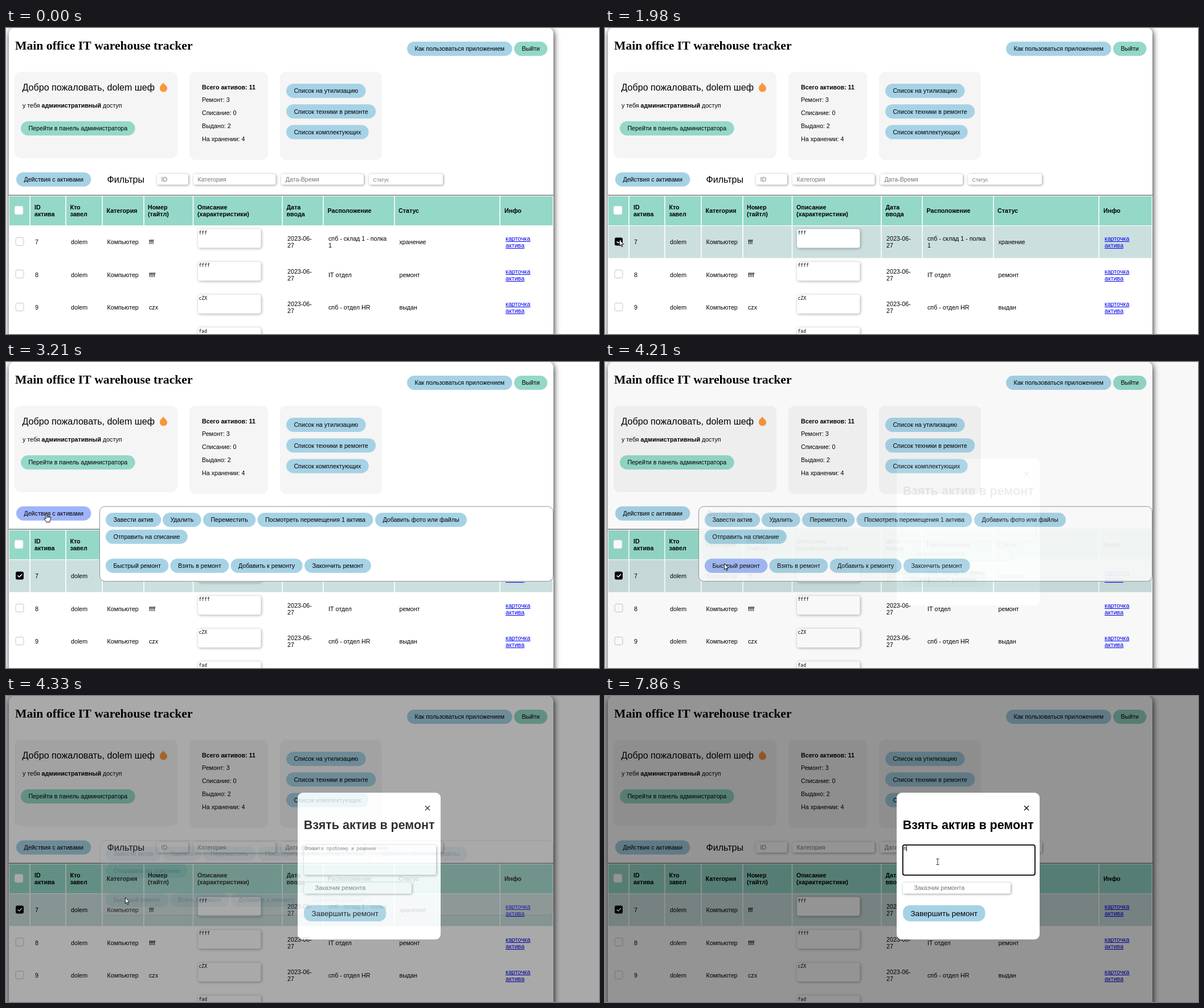
An HTML page with a canvas for the animation above (8 s loop, 1041 px wide and 538 px high).

```html
<!DOCTYPE html>
<html lang="ru">
<head>
<meta charset="utf-8">
<title>Warehouse tracker</title>
<style>
  html, body { margin: 0; width: 100%; height: 100%; overflow: hidden; background: #fff; }
  canvas { position: absolute; left: 0; top: 0; }
</style>
</head>
<body>
<script>
const W = 1041, H = 538, LOOP = 8000;
const SANS = '"Liberation Sans", Arial, sans-serif';
const SERIF = '"Liberation Serif", Cambria, serif';
const MONO = '"DejaVu Sans Mono", monospace';
const BODY = '10.7px ' + SANS, BOLD = 'bold ' + BODY, CODE = '8px ' + MONO;
const BLUE = [166, 210, 230], TEAL = [148, 216, 200], HOVER = [160, 180, 250];
const HINT = '#757575', USER = 'dolem';

function layer() {
  const c = document.createElement('canvas');
  c.width = W;
  c.height = H;
  document.body.appendChild(c);
  return c.getContext('2d');
}
const page = layer(), menu = layer(), modal = layer(), pointer = layer();
let g = page;

const rgb = c => `rgb(${c.map(Math.round)})`;
const mix = (a, b, p) => a.map((v, i) => v + (b[i] - v) * p);
const clamp = p => Math.max(0, Math.min(1, p));
const ramp = (t, a, b) => clamp((t - a) / (b - a));

// Piecewise linear value over [time, value] points
function keyed(t, keys) {
  if (t <= keys[0][0]) return keys[0][1];
  for (let i = 1; i < keys.length; i++) {
    const [t0, v0] = keys[i - 1], [t1, v1] = keys[i];
    if (t < t1) return v0 + (v1 - v0) * (t - t0) / (t1 - t0);
  }
  return keys[keys.length - 1][1];
}

function text(s, x, y, font = BODY, color = '#000') {
  g.font = font;
  g.fillStyle = color;
  g.fillText(s, x, y);
  return g.measureText(s).width;
}

function rect(x, y, w, h, color) {
  g.fillStyle = color;
  g.fillRect(x, y, w, h);
}

function box(x, y, w, h, r, fill, stroke, lw = 1) {
  g.beginPath();
  g.roundRect(x, y, w, h, r);
  if (fill) { g.fillStyle = fill; g.fill(); }
  if (stroke) { g.strokeStyle = stroke; g.lineWidth = lw; g.stroke(); }
}

function shadowed(blur, dx, dy, color, draw) {
  g.save();
  g.shadowBlur = blur;
  g.shadowOffsetX = dx;
  g.shadowOffsetY = dy;
  g.shadowColor = color;
  draw();
  g.restore();
}

const field = (x, y, w, h) =>
  shadowed(4, 1, 1, 'rgba(0,0,0,.4)', () => box(x, y, w, h, 3, '#fff'));

function button(s, x, y, color = BLUE, size = 10.7, h = 25) {
  g.font = `${size}px ${SANS}`;
  box(x, y, g.measureText(s).width + 26.8, h, 12.5, rgb(color));
  text(s, x + 13.4, y + h / 2 + size * .36, g.font);
}

function flame() {
  g.fillStyle = '#f9963b';
  g.beginPath();
  g.moveTo(276, 95.5);
  g.bezierCurveTo(277, 99, 283, 101, 283, 106);
  g.bezierCurveTo(283, 114.5, 270, 114.5, 270, 106);
  g.bezierCurveTo(270, 103, 271, 101.5, 272.5, 100);
  g.bezierCurveTo(274, 99, 275.5, 98, 276, 95.5);
  g.fill();
}

const EDGES = [6, 42, 105, 169, 242, 328.5, 485, 557, 682, 867, 960.5];
const HEADS = [
  [50, 'ID', 'актива'], [112.5, 'Кто', 'завел'], [176.5, 'Категория'],
  [249, 'Номер', '(тайтл)'], [336, 'Описание', '(характеристики)'],
  [492.5, 'Дата', 'ввода'], [564.5, 'Расположение'], [689, 'Статус'], [875, 'Инфо']
];
const ROWS = [
  ['7', 'fff', 'fff', ['спб - склад 1 - полка', '1'], 'хранение'],
  ['8', 'ffff', 'ffff', ['IT отдел'], 'ремонт'],
  ['9', 'czx', 'cZX', ['спб - отдел HR'], 'выдан'],
  ['10', 'fad', 'fad', ['IT отдел'], 'хранение']
];
const PITCH = 57.7;

function lines(list, x, mid, font, color) {
  list.forEach((s, i) => text(s, x, mid + 4 + (i - (list.length - 1) / 2) * 12, font, color));
}

function cells(y, h, color) {
  for (let i = 0; i < EDGES.length - 1; i++) {
    const x = EDGES[i] + (i ? .8 : 0);
    rect(x, y, EDGES[i + 1] - .8 - x, h, color);
  }
}

function checkbox(x, y, checked, hot) {
  if (!checked) return box(x + .5, y + .5, 14, 14, 3, '#fff', hot ? '#888' : '#c6c6c6');
  box(x + .5, y + .5, 14, 14, 3, '#000');
  g.strokeStyle = '#fff';
  g.lineWidth = 1.6;
  g.beginPath();
  g.moveTo(x + 4, y + 7.5);
  g.lineTo(x + 6.8, y + 10);
  g.lineTo(x + 11.5, y + 5);
  g.stroke();
}

function row(i, t, hot) {
  const [id, name, note, place, status] = ROWS[i];
  const y = i * PITCH, mid = 376 + y, picked = i === 0 && t >= 1980;
  if (picked) cells(348, 56.5, '#cbdfde');
  else if (hot) cells(348 + y, 56.5, '#f5f5f5');
  checkbox(16.5, Math.round(367.5 + y), picked, hot && t > 1600);
  shadowed(5, 1, 1, 'rgba(0,0,0,.35)', () => box(337, 353.5 + y, 110.5, 33, 4, '#fff'));
  text(note, 338.5, 362.5 + y, CODE);
  if (mid > H) return;
  text(id, 51, mid + 4);
  text(USER, 114, mid + 4);
  text('Компьютер', 177.5, mid + 4);
  text(name, 251, mid + 4);
  lines(['2023-06-', '27'], 494, mid);
  lines(place, 566, mid);
  text(status, 690.5, mid + 4);
  ['карточка', 'актива'].forEach((s, k) => {
    const base = mid - 2 + k * 12;
    const w = text(s, 877, base, BODY, '#0000ee');
    rect(877, Math.round(base + 1), w, 1, '#0000ee');
  });
}

function drawPage(t, cur) {
  g = page;
  rect(0, 0, W, H, '#fff');
  shadowed(11, 1, 3, 'rgba(0,0,0,.85)', () => box(5, -1, 956, 620, 11, '#fff'));

  text('Main office IT warehouse tracker', 16, 37.5, 'bold 21.7px ' + SERIF);
  button('Как пользоваться приложением', 704, 24);
  button('Выйти', 892, 24, TEAL);

  box(15, 77, 286, 152, 11, '#f5f5f5');
  box(322, 77, 138, 155, 11, '#f5f5f5');
  box(481, 77, 179, 155, 11, '#f5f5f5');

  text(`Добро пожаловать, ${USER} шеф`, 28.5, 110, '16.1px ' + SANS);
  flame();
  let x = 29;
  x += text('у тебя ', x, 139.5);
  x += text('административный', x, 139.5, BOLD);
  text(' доступ', x, 139.5);
  button('Перейти в панель администратора', 26, 164, TEAL);

  ['Всего активов: 11', 'Ремонт: 3', 'Списание: 0', 'Выдано: 2', 'На хранении: 4']
    .forEach((s, i) => text(s, 344, 107.5 + i * 22.9, i ? BODY : BOLD));
  ['Список на утилизацию', 'Список техники в ремонте', 'Список комплектующих']
    .forEach((s, i) => button(s, 492, 98 + i * 36.2));

  const hot = ramp(t, 2400, 2610) - ramp(t, 3480, 3640);
  button('Действия с активами', 18, 253.7, mix(BLUE, HOVER, hot));
  text('Фильтры', 177.5, 272, '16.1px ' + SANS);
  [[265, 55, 'ID'], [329, 144.5, 'Категория'], [483, 145, 'Дата-Время'], [637, 130, 'Статус']]
    .forEach(([fx, w, s], i) => {
      field(fx, 256.5, w, 19);
      text(s, fx + 7.5, i < 3 ? 270 : 269.5, i < 3 ? BODY : '8.9px ' + SANS, HINT);
    });

  rect(5, 293.5, 956, 1.2, '#555');
  cells(296, 51, rgb(TEAL));
  box(15, 313, 15, 15, 3, '#fff', '#d2dedb', .8);
  HEADS.forEach(([hx, ...s]) => lines(s, hx, 321, BOLD));

  const inTable = t >= 250 && t < 1980 && cur.x < 961 && cur.y > 348;
  const over = inTable ? Math.floor((cur.y - 347.5) / PITCH) : -1;
  ROWS.forEach((_, i) => row(i, t, i === over));
}

const ACTIONS = [
  [175, 265, 'Завести актив'], [275, 265, 'Удалить'], [346, 265, 'Переместить'],
  [441.5, 265, 'Посмотреть перемещения 1 актива'], [648, 265, 'Добавить фото или файлы'],
  [175, 294.7, 'Отправить на списание'], [175, 345.7, 'Быстрый ремонт'],
  [288.5, 345.7, 'Взять в ремонт'], [394.5, 345.7, 'Добавить к ремонту'],
  [524, 345.7, 'Закончить ремонт']
];

function drawMenu(t) {
  g = menu;
  g.clearRect(0, 0, W, H);
  box(164.5, 254, 796, 131.5, 9, '#fff', '#8d9393');
  const hot = ramp(t, 3760, 3910) - ramp(t, 4190, 4330);
  ACTIONS.forEach(([x, y, s], i) => button(s, x, y, i === 6 ? mix(BLUE, HOVER, hot) : BLUE));
}

function drawModal(t) {
  g = modal;
  g.clearRect(0, 0, W, H);
  rect(0, 0, W, H, 'rgba(0,0,0,.42)');
  box(512, 170, 251, 258, 9, '#fff');
  g.strokeStyle = '#000';
  g.lineWidth = 1.3;
  g.beginPath();
  g.moveTo(736, 193); g.lineTo(744, 201);
  g.moveTo(744, 193); g.lineTo(736, 201);
  g.stroke();
  text('Взять актив в ремонт', 522.7, 234, 'bold 21.44px ' + SANS);

  const focus = t >= 5350, typed = t >= 7860;
  if (focus) box(522.8, 261.8, 232, 53, 3, '#fff', '#000', 1.8);
  else field(523, 262, 232, 52.5);
  if (typed) text('п', 524, 271, CODE);
  else text('Опишите проблему и решение', 524, 271, CODE, HINT);
  const caret = focus && !(t >= 6280 && t < 6450) && !(t >= 6930 && !typed);
  if (caret) rect(typed ? 529 : 524, 263, 1, 10, '#000');

  field(523, 328, 189, 19.5);
  text('Заказчик ремонта', 542.5, 341, BODY, HINT);
  button('Завершить ремонт', 523, 367.7, BLUE, 13.4, 28.5);
}

// start, end, number of steps, x, y
const MOVES = [
  [250, 1030, 12, 121, 372],
  [1110, 1260, 3, 37, 374],
  [1460, 1760, 5, 25, 372],
  [2250, 2610, 6, 68, 259],
  [2910, 2980, 2, 71, 266],
  [3480, 3910, 7, 209, 354],
  [4700, 5280, 9, 584, 291]
];

function cursorAt(t) {
  let x = 994, y = 524;
  for (const [t0, t1, n, x1, y1] of MOVES) {
    if (t < t0) break;
    const k = Math.floor(ramp(t, t0, t1) * (n - 1) + .01);
    const p = (k + 1) / n, e = p * p * (3 - 2 * p);
    x += (x1 - x) * e;
    y += (y1 - y) * e;
  }
  return { x, y };
}

function poly(points) {
  g.beginPath();
  points.forEach(([x, y]) => g.lineTo(x, y));
  g.closePath();
  g.fill();
  g.stroke();
}

function drawCursor(t, { x, y }) {
  g = pointer;
  g.clearRect(0, 0, W, H);
  if (t < 250) return;
  g.save();
  g.translate(x, y);
  g.fillStyle = '#fff';
  g.strokeStyle = '#000';
  g.lineWidth = .9;
  g.lineJoin = 'round';
  if (t >= 4700 && x > 523 && x < 755 && y > 261) {
    g.strokeStyle = '#333';
    g.lineWidth = 1;
    g.beginPath();
    g.moveTo(-2.5, -4.5); g.lineTo(2.5, -4.5);
    g.moveTo(0, -4.5); g.lineTo(0, 5.5);
    g.moveTo(-2.5, 5.5); g.lineTo(2.5, 5.5);
    g.stroke();
  } else if (t >= 2760 && t < 3540) {
    poly([[-1, .8], [0, 0], [1, .8], [1.2, 5], [3.4, 5], [5.4, 5.6], [7.2, 6.4], [7.4, 10.5],
      [6, 13], [6, 15.5], [-.5, 15.5], [-1, 13.6], [-4, 9.6], [-3.4, 8.4], [-1, 10]]);
    g.beginPath();
    for (const fx of [1.2, 3.3, 5.3]) { g.moveTo(fx, 5); g.lineTo(fx, 8); }
    g.stroke();
  } else {
    poly([[.4, .4], [.4, 11], [2.8, 8.8], [4.4, 12.8], [6, 12.1], [4.4, 8.2], [7.8, 8.1]]);
  }
  g.restore();
}

function frame(now) {
  const t = now % LOOP, cur = cursorAt(t);
  const shown = keyed(t, [[4040, 0], [4210, .06], [4330, .8], [4400, .95], [4480, 1]]);
  const opened = keyed(t, [[2890, 0], [2980, .18], [3050, .6], [3130, .88], [3210, 1]]);
  drawPage(t, cur);
  drawMenu(t);
  drawModal(t);
  drawCursor(t, cur);
  menu.canvas.style.opacity = opened * (1 - shown);
  modal.canvas.style.opacity = shown;
}

const start = performance.now();
function tick() {
  frame(performance.now() - start);
  requestAnimationFrame(tick);
}
tick();
</script>
</body>
</html>
```
